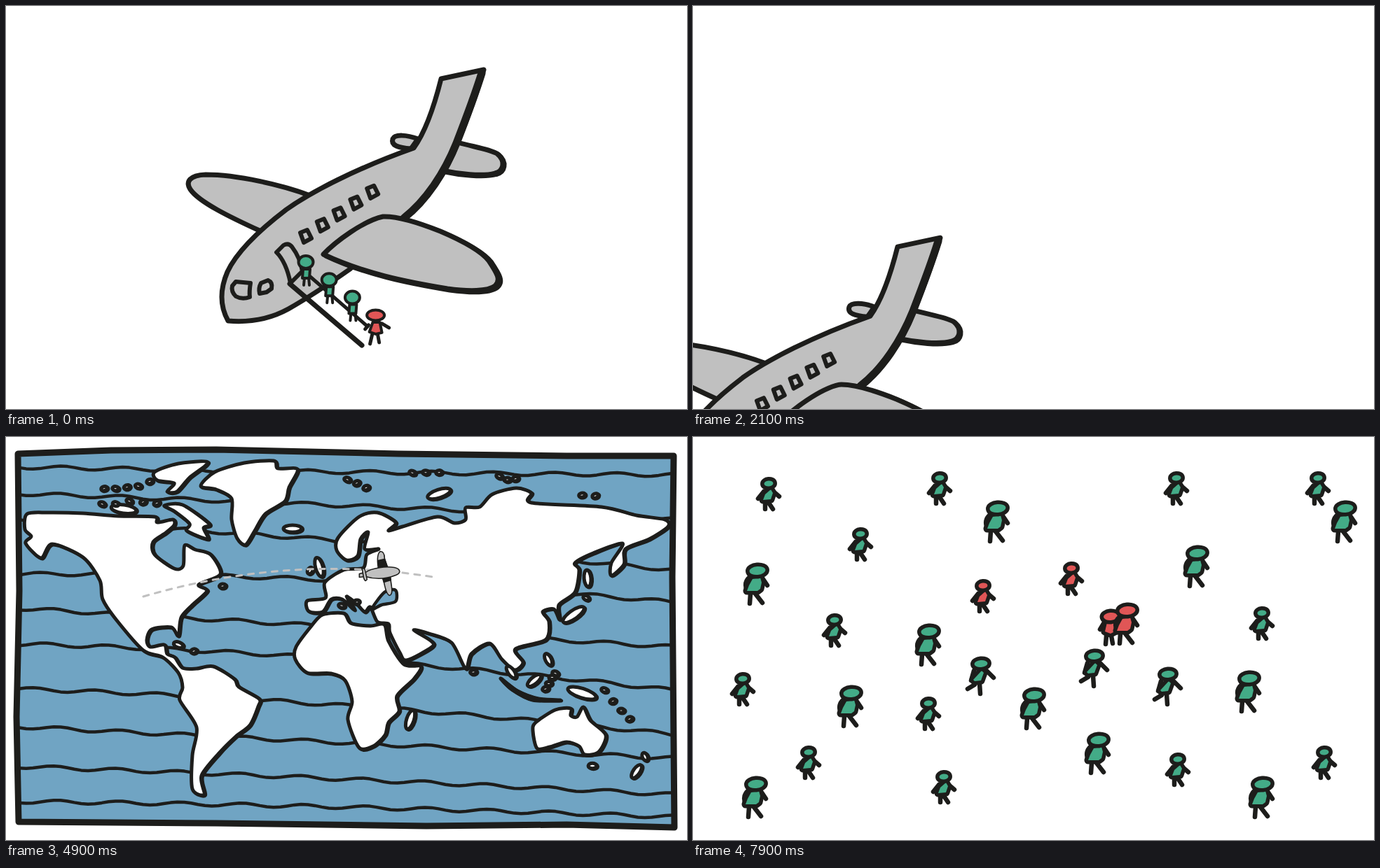
Write an HTML page that moves like this. It is 972 px wide and 576 px high and loops after 8 s.

```html
<!DOCTYPE html>
<html lang="en">
<head>
<meta charset="utf-8">
<title>Flight</title>
<style>
  html, body { margin: 0; width: 100%; height: 100%; overflow: hidden; background: #fff; }
  svg { display: block; width: 100vw; height: 100vh; }
</style>
</head>
<body>
<svg id="stage" viewBox="0 0 972 576" stroke-linecap="round" stroke-linejoin="round"></svg>
<script>
const INK = '#1d1d1b', GREY = '#c0c0c0', SEA = '#70a4c3', GREEN = '#43ab87', RED = '#e05656';
const LOOP = 8000, STEP = 200, HOLD = 500;

const lerp = (a, b, k) => a + (b - a) * k;
const random = seed => { const v = Math.sin(seed * 12.9898) * 43758.5453; return v - Math.floor(v); };
const range = n => [...Array(n).keys()];

const poly = pts => `<polygon points="${pts}"/>`;
const path = (d, attrs = '') => `<path d="${d}" ${attrs}/>`;
const group = (attrs, inner) => `<g ${attrs}>${inner}</g>`;
const at = (x, y, inner) => group(`transform="translate(${x} ${y})"`, inner);
const line = (d, width) => path(d, `fill="none" stroke="${INK}" stroke-width="${width}"`);
const ellipse = (x, y, rx, ry, tilt = 0) =>
  `<ellipse cx="${x}" cy="${y}" rx="${rx}" ry="${ry}" transform="rotate(${tilt} ${x} ${y})"/>`;
// A shifted copy below makes the right and lower edges heavier.
const shaded = (shape, dx, dy) => at(dx, dy, shape) + shape;

// Closed curve through the given points.
function smooth(text) {
  const p = text.split(' ').map(s => s.split(',').map(Number)), n = p.length;
  const handle = (i, sign) => [0, 1].map(c =>
    (p[i % n][c] + sign * (p[(i + 1) % n][c] - p[(i + n - 1) % n][c]) / 7).toFixed(1));
  return path(`M${p[0]}` + p.map((_, i) =>
    `C${handle(i, 1)} ${handle(i + 1, -1)} ${p[(i + 1) % n]}`).join('') + 'Z');
}

/* ---- big plane ---- */
const cabin = range(5).map(i => path(`M${420 + i * 23.8},${324 - i * 15.8}l10,-4l6,12l-11,6z`)).join('');

const airliner = group(`fill="${GREY}" stroke="${INK}" stroke-width="7"`,
  path('M434,271C395,256 330,241 285,241C262,242 256,251 263,262C275,280 320,302 364,322Z') +
  path('M588,190C572,184 555,183 552,190C549,199 560,203 578,204Z') +
  shaded(path('M645,195C665,201 688,204 701,211C714,222 710,236 698,239C680,244 645,240 622,235Z'), 2, 1.5) +
  path('M317,450C307,432 304,408 316,380C330,350 362,320 400,291C435,266 500,232 582,203' +
    'C600,178 612,140 621,104L682,91C671,128 657,165 645,195C628,240 600,278 565,305' +
    'L491,376Q440,412 403,433Q365,454 317,450Z') +
  line('M679,96C669,128 655,165 643,196C626,238 600,278 568,303', 11) +
  shaded(path('M453,355C470,337 510,307 538,301C560,300 590,310 620,322C655,337 678,350 689,364' +
    'C701,382 707,392 698,400C688,408 660,408 630,404C570,394 510,382 453,355Z'), 3.5, 2) +
  group('stroke-width="6"', cabin +
    path('M328,394L349,396Q347,408 348,416Q337,420 328,415Q321,408 323,400Z') +
    path('M364,396L374,392Q381,395 379,404L372,409L362,411Q360,403 364,396Z') +
    path('M386,352L396,342Q403,338 408,344Q420,360 423,379L406,396Q400,366 386,352Z')));

const stairs = line('M405,397L508,485', 7) + line('M424,378L516,458', 5);

const passenger = group(`fill="${GREEN}" stroke="${INK}" stroke-width="4"`,
  path('M-2,22L-3,33M4,22L5,33') + path('M-4,10H6L5,23H-5Z') + ellipse(0, 0, 10.5, 9));
const redPassenger = group(`fill="${RED}" stroke="${INK}" stroke-width="4"`,
  path('M-5,28L-8,41M3,28L5,39M-10,14L-15,20M9,12L19,18', 'stroke-width="5"') +
  path('M-4,10H6L9,25L0,27L-9,24Z') + ellipse(0, 0, 12.5, 7.5));

/* ---- map ---- */
const continents = {
  americas: '30,110 60,108 110,109 160,113 212,114 216,122 238,118 240,126 228,137 210,150 212,168 240,188 253,184 255,155 270,161 292,168 306,196 275,211 287,220 266,240 250,258 246,284 236,272 208,275 201,290 206,300 226,297 230,310 241,315 252,330 272,331 296,328 326,346 332,357 361,374 360,385 348,412 328,428 304,452 279,484 283,511 266,503 266,455 272,415 248,376 252,358 246,337 224,315 196,305 158,262 138,232 134,205 110,172 66,153 50,173 28,152 36,142 27,132',
  greenland: '278,70 298,50 340,37 382,34 388,45 416,46 404,72 398,92 370,110 355,134 342,154 330,145 322,118 322,88 300,75',
  ellesmere: '212,50 246,38 288,36 262,58 244,78 230,78 240,66 216,62',
  baffin: '226,98 252,97 290,124 282,130 288,146 258,134 262,124 240,106',
  africa: '414,300 436,270 452,254 482,252 492,266 520,270 540,268 546,292 568,325 592,328 582,346 558,370 561,392 546,408 541,426 524,442 504,444 488,404 494,378 484,348 464,338 430,337 413,318',
  eurasia: '430,234 432,249 452,250 464,232 480,232 497,247 486,228 500,238 512,250 520,243 530,264 546,267 548,280 562,308 572,319 608,300 606,291 582,276 604,281 636,294 656,331 664,310 690,295 708,318 726,333 738,322 727,303 770,290 775,264 766,250 782,246 790,261 789,240 812,222 818,190 812,180 838,166 880,152 864,180 864,198 882,182 884,160 918,146 945,128 940,118 900,112 850,100 750,94 750,80 728,73 694,82 676,100 656,101 656,118 640,123 616,114 566,128 546,134 556,122 530,108 504,114 474,144 472,162 486,176 502,170 506,146 517,136 512,160 532,160 515,168 510,187 482,190 455,208 456,230',
  australia: '752,420 756,408 784,390 806,388 806,398 815,400 824,386 834,405 856,426 846,450 826,454 818,442 800,436 776,443 758,445',
  sumatra: '706,345 730,363 760,374 791,376 750,375 722,361'
};

// x, y, half length, tilt
const islands = [
  [409, 131, 13, 0], [447, 186, 14, 75], [434, 191, 5, -60], [168, 103, 18, 8], [577, 404, 14, -72],
  [754, 348, 12, -40], [822, 366, 21, 18], [721, 336, 10, 55], [774, 318, 9, 65], [810, 254, 18, -35],
  [830, 202, 12, 85], [618, 81, 17, -18], [246, 297, 7, 20], [912, 457, 6, 65], [900, 478, 11, -55], [837, 470, 6, 0]
].map(([x, y, size, tilt]) => ellipse(x, y, size, 2.5 + size / 5, tilt)).join('');

// Islets strung from one end to the other: x0, y0, x1, y1, count
const islets = [
  [140, 74, 205, 66, 5], [137, 94, 215, 93, 5], [487, 62, 514, 70, 3], [580, 52, 618, 51, 3],
  [704, 55, 727, 62, 3], [822, 83, 841, 84, 2], [770, 358, 784, 337, 4], [854, 364, 890, 405, 4],
  [479, 241, 501, 236, 2], [268, 306, 309, 213, 2], [667, 336, 828, 230, 2]
].map(([x0, y0, x1, y1, n]) => range(n).map(i => {
  const k = i / (n - 1), stray = n > 2 ? 6 * random(x0 + i) - 3 : 0;
  return ellipse(lerp(x0, x1, k), lerp(y0, y1, k) + stray, 4.5, 3, 60 * random(y0 + i) - 30);
}).join('')).join('');

// Wavy line across the sea, given its height at the left, in the middle and at the right.
function wave([left, mid, right]) {
  return 'M' + range(96).map(i => {
    const k = i / 95, x = lerp(19, 951, k);
    const y = left * (1 - k) * (1 - 2 * k) + 4 * mid * k * (1 - k) + right * k * (2 * k - 1);
    return `${x.toFixed(1)},${(y + 2.5 * Math.sin(x / 14 + left)).toFixed(1)}`;
  }).join('L');
}
const waves = [
  [43, 50, 54], [81, 98, 118], [118, 149, 190], [196, 205, 236], [245, 272, 300],
  [296, 318, 362], [360, 384, 425], [414, 437, 459], [471, 489, 511], [521, 529, 543]
].map(wave).join('');

const world =
  group(`fill="${SEA}" stroke="${INK}" stroke-width="9"`,
    poly('17,24 150,19 300,18 560,24 800,27 953,27 951,200 954,558 800,554 600,556 300,552 18,550 15,400 19,220')) +
  line(waves, 4.5) +
  group(`fill="#fff" stroke="${INK}" stroke-width="5"`,
    shaded(Object.values(continents).map(smooth).join('') + islands + islets, 1.6, 1)) +
  group(`fill="${SEA}" stroke="${INK}" stroke-width="4.5"`, smooth('522,246 540,222 556,219 556,235 536,240'));

const trail = path('M196,228Q405,167 609,200',
  `fill="none" stroke="${GREY}" stroke-width="3" stroke-dasharray="8 9"`);
const miniPlane = group(`fill="${GREY}" stroke="${INK}" stroke-width="1.6"`,
  path('M205,219Q202,199 208,195Q214,195 214,205L218,217Z') +
  path('M212,233Q216,257 221,258Q226,257 224,245L222,231Z') +
  group(`fill="${INK}"`, path('M205,208L214,206L218,217L206,219Z') + path('M211,233L222,231L223,236L213,239Z')) +
  path('M178,227L187,225C195,219 215,216 228,218C237,220 238,226 230,229C215,235 200,235 187,231L178,232Z') +
  path('M182,220Q186,217 187,226L189,235Q186,240 184,232Z'));

/* ---- crowd ---- */
const kinds = {
  big: { head: [2, -19, 11.5, 6], body: '-5,-7 6,-9 8,-2 6,7 2,10 -13,10 -10,2',
    limbs: 'M-9,-10Q-18,-2 -13,9M8,-10L16,2M-8,14L-9,28M-1,14L9,27' },
  small: { head: [0, -15.5, 6.5, 4], body: '3,-7 6,-2 3,7 -8,8 -5,0',
    limbs: 'M-7,-4L-15,6M8,-3L15,3M-5,11V21M0,12L6,21' },
  run: { head: [1, -18, 9.5, 5], body: '2,-8 5,-5 1,6 -8,7 -10,5',
    limbs: 'M9,-8L19,2M-9,-8L-13,6M-8,12L-18,18M-1,10L0,25' },
  walk: { head: [0, -16.5, 10, 5.5], body: '-5,-8 6,-8 8,4 0,8 -8,5',
    limbs: 'M-9,-8L-15,2M9,-7L18,1M-6,11L-7,23M1,11L3,22' }
};
function person(kind, x, y, red) {
  const { head, body, limbs } = kinds[kind];
  return at(x, y, line(limbs, 6.5) +
    group(`fill="${red ? RED : GREEN}" stroke="${INK}" stroke-width="11" paint-order="stroke"`,
      poly(body) + ellipse(...head, -5)));
}
// x, y, time of turning red, time of leaving
const crowd = {
  small: [[108, 82], [352, 74], [690, 74], [892, 74], [239, 154], [540, 203, 7500], [414, 228, 6500],
    [202, 277], [812, 267], [71, 361], [336, 396], [165, 466], [358, 501], [692, 476], [901, 466]],
  run: [[410, 342], [572, 331], [677, 357]],
  big: [[433, 121], [569, 67, Infinity, 5900], [929, 121], [90, 210], [718, 185], [618, 267, 7900],
    [335, 297], [224, 385], [485, 388], [792, 364], [577, 452], [88, 515], [811, 515]]
};

/* ---- motion ---- */
function track(t, keys) {
  let i = 1;
  while (i < keys.length - 1 && t > keys[i][0]) i++;
  const [t0, ...a] = keys[i - 1], [t1, ...b] = keys[i];
  const k = Math.min(1, Math.max(0, (t - t0) / (t1 - t0)));
  return a.map((v, n) => lerp(v, b[n], k));
}

function boarding(t) {
  const climbed = t < HOLD ? 0 : 1 + (t - HOLD) / STEP;
  const gone = 11.2 * Math.max(0, (t - 1016) / STEP) ** 2;
  let out = at(-gone, gone * 0.73, airliner);
  if (climbed < 4) out += stairs;
  for (let i = climbed; i < 4; i++) {
    const slot = i - climbed;
    out += at(428 + slot * 33.2, 366 + slot * 25.3, i < 3 ? passenger : redPassenger);
  }
  return out;
}

function flight(t) {
  const [x] = track(t, [[2700, 0], [3900, 203], [5100, 351]]);
  const y = x < 270 ? -36 * (1 - (1 - x / 270) ** 1.5) : -36 + 0.0014 * (x - 270) ** 2;
  return world + (t > 2700 ? trail : '') + at(x, y, miniPlane);
}

function spreading(t) {
  const [x, y] = track(t, [[5700, 490, 287], [6300, 414, 255], [6500, 414, 255], [7500, 536, 250], [7900, 596, 273]]);
  let out = person('walk', x, y, true);
  for (const kind in crowd)
    for (const [px, py, ill = Infinity, leave = Infinity] of crowd[kind])
      if (t < leave) out += person(kind, px, py, t >= ill);
  return out;
}

const stage = document.getElementById('stage');
let shown = -1;

function draw(now) {
  const raw = now % LOOP;
  const t = raw < HOLD ? 0 : HOLD + STEP * Math.floor((raw - HOLD) / STEP);
  if (t === shown) return;
  shown = t;
  stage.innerHTML = (t < 2700 ? boarding : t < 5300 ? flight : spreading)(t);
}

const start = performance.now();
function tick() {
  draw(performance.now() - start);
  requestAnimationFrame(tick);
}
tick();
</script>
</body>
</html>
```
